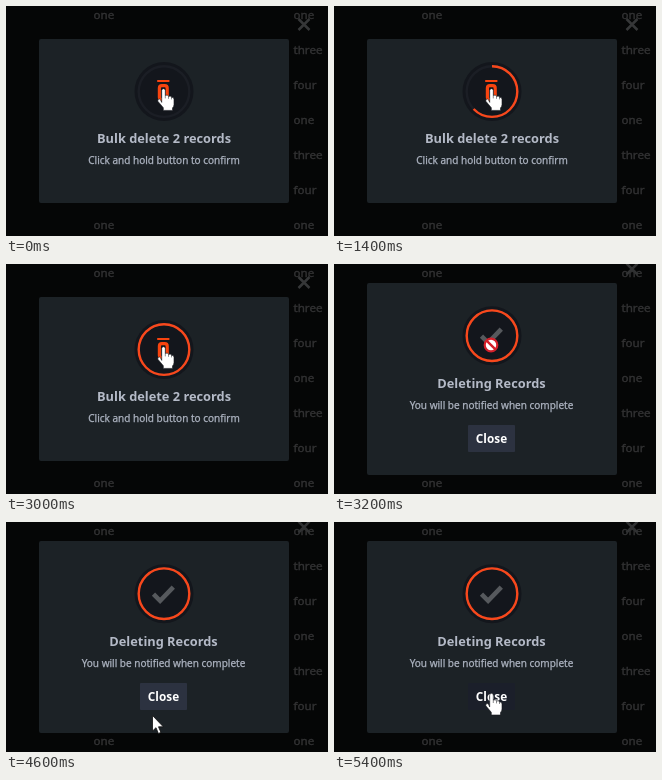
An HTML page for the animation above (5600 ms loop, 322 px wide and 230 px high).

```html
<!DOCTYPE html>
<html lang="en">
<head>
<meta charset="utf-8">
<title>Hold to delete</title>
<style>
  html, body { margin: 0; width: 100%; height: 100%; overflow: hidden; background: #050606; }
  svg { display: block; width: 322px; height: 230px; font: 10px "Noto Sans", "Open Sans", sans-serif; }
  .row { font-size: 11.6px; fill: #323233; stroke: #323233; stroke-width: .4; }
  .mid { text-anchor: middle; fill: #adb4c1; stroke: #adb4c1; stroke-width: .25; }
  .title { font-size: 12.8px; font-weight: 700; fill: #b4bac7; stroke: none; }
  .btn { font-size: 11.8px; font-weight: 700; fill: #fff; stroke: none; }
  .line { fill: none; }
</style>
</head>
<body>
<svg viewBox="0 0 322 230">
  <g id="rows" class="row"></g>
  <path id="cross" class="line" d="M292.5 13l11 11m0-11l-11 11" stroke-width="2.5"/>
  <rect id="panel" x="33" width="250" rx="2" fill="#1c2226"/>

  <g id="dial">
    <circle r="29.5" fill="#13161c"/>
    <circle class="line" r="25.3" stroke="#1b1e25" stroke-width="2.4"/>
    <circle id="ring" class="line" r="25.3" pathLength="360" stroke="#f8481c" stroke-width="2.4" transform="rotate(-90)"/>
  </g>

  <g id="ask">
    <path fill="#f8440f" d="M151.2 74h12.2v2h-12.2z"/>
    <rect class="line" stroke="#f8440f" stroke-width="3.2" x="153.4" y="79.6" width="7.8" height="14" rx="2.4"/>
    <text class="mid title" x="158" y="137">Bulk delete 2 records</text>
    <text class="mid" x="158" y="158">Click and hold button to confirm</text>
  </g>

  <g id="done">
    <path class="line" stroke="#56595d" stroke-width="4.6" d="M147.5 72.2l6.6 6.6 13.2-13.6"/>
    <text class="mid title" x="157.5" y="124">Deleting Records</text>
    <text class="mid" x="157.5" y="145">You will be notified when complete</text>
    <rect id="button" x="134" y="161" width="47" height="27" rx="1"/>
    <text class="mid btn" x="157.5" y="179">Close</text>
  </g>

  <g id="hand" stroke="#15171b" stroke-width=".6">
    <path fill="#fff" d="M4.7 14V2Q4.8 .3 6.5 .3T8.3 2V7q3-1 3.2 1q2.8-1 3 1q2.5-.5 2.5 2v5q0 2-1.5 3.5V22H6.3V19.3L.8 12.8q-.5-2.2 1.6-2.2Q3.8 11 4.7 14z"/>
    <path class="line" d="M8.3 7v3m3.2-2v2.4m3-1.4v2" stroke-width=".5"/>
  </g>
  <path id="arrow" fill="#fff" stroke="#111" stroke-width=".8" d="M.5 .5V16l3.5-3.3 2.4 5.8 2.5-1.1-2.4-5.6h4.8z"/>
  <g id="stop">
    <circle r="6.3" fill="#fff" stroke="#d3202a" stroke-width="2.2"/>
    <path d="M-4.4-4.4l8.8 8.8" stroke="#d3202a" stroke-width="2.4"/>
  </g>
</svg>
<script>
const LOOP = 5600, STEP = 200, SWITCH = 3200;
const el = id => document.getElementById(id);
const show = (id, on) => el(id).style.display = on ? "" : "none";
const place = (id, x, y) => el(id).setAttribute("transform", `translate(${x} ${y})`);

const words = ["one", "three", "four"];
const row = (x, i, word) => `<text x="${x}" y="${13 + 35 * i}">${word}</text>`;
let rows = row(87.5, 0, "one") + row(87.5, 6, "one");
for (let i = 0; i < 7; i++) rows += row(287.5, i, words[i % 3]);
el("rows").innerHTML = rows;

// [start, cursor, x, y]
const cursors = [
  [0, "hand", 151, 82.4],
  [3200, "stop", 157, 81],
  [4000, "arrow", 232, 89],
  [4200, "arrow", 222, 129],
  [4400, "arrow", 172, 188],
  [4600, "arrow", 146, 193],
  [4800, "hand", 148, 177],
  [5000, "hand", 151, 171]
];

// cubic-bezier(0, 0, .58, 1)
function easeOut(x) {
  let lo = 0, hi = 1;
  for (let i = 0; i < 24; i++) {
    const t = (lo + hi) / 2;
    if (1.74 * t * t * (1 - t) + t ** 3 < x) lo = t; else hi = t;
  }
  return lo * lo * (3 - 2 * lo);
}

function draw(t) {
  const done = t >= SWITCH;
  show("ask", !done);
  show("done", done);
  el("panel").setAttribute("y", done ? 19 : 33);
  el("panel").setAttribute("height", done ? 192 : 164);
  place("cross", 0, done ? -13.5 : 0);
  el("cross").setAttribute("stroke", done ? "#303132" : "#363738");
  place("dial", 158, done ? 71.7 : 85.6);

  const held = Math.min(1, Math.max(0, (t - 50) / 3000));
  show("ring", held > 0);
  el("ring").setAttribute("stroke-dasharray", held > .98 ? "none" : `${360 * easeOut(held)} 400`);
  el("button").setAttribute("fill", t >= 5400 ? "#1b1f2a" : "#2c3240");

  const [, kind, x, y] = cursors.filter(c => c[0] <= t).pop();
  for (const id of ["hand", "arrow", "stop"]) show(id, id === kind);
  place(kind, x, y);
}

const start = performance.now();
function tick() {
  const t = (performance.now() - start) % LOOP;
  draw(Math.floor(t / STEP) * STEP);
  requestAnimationFrame(tick);
}
tick();
</script>
</body>
</html>
```
